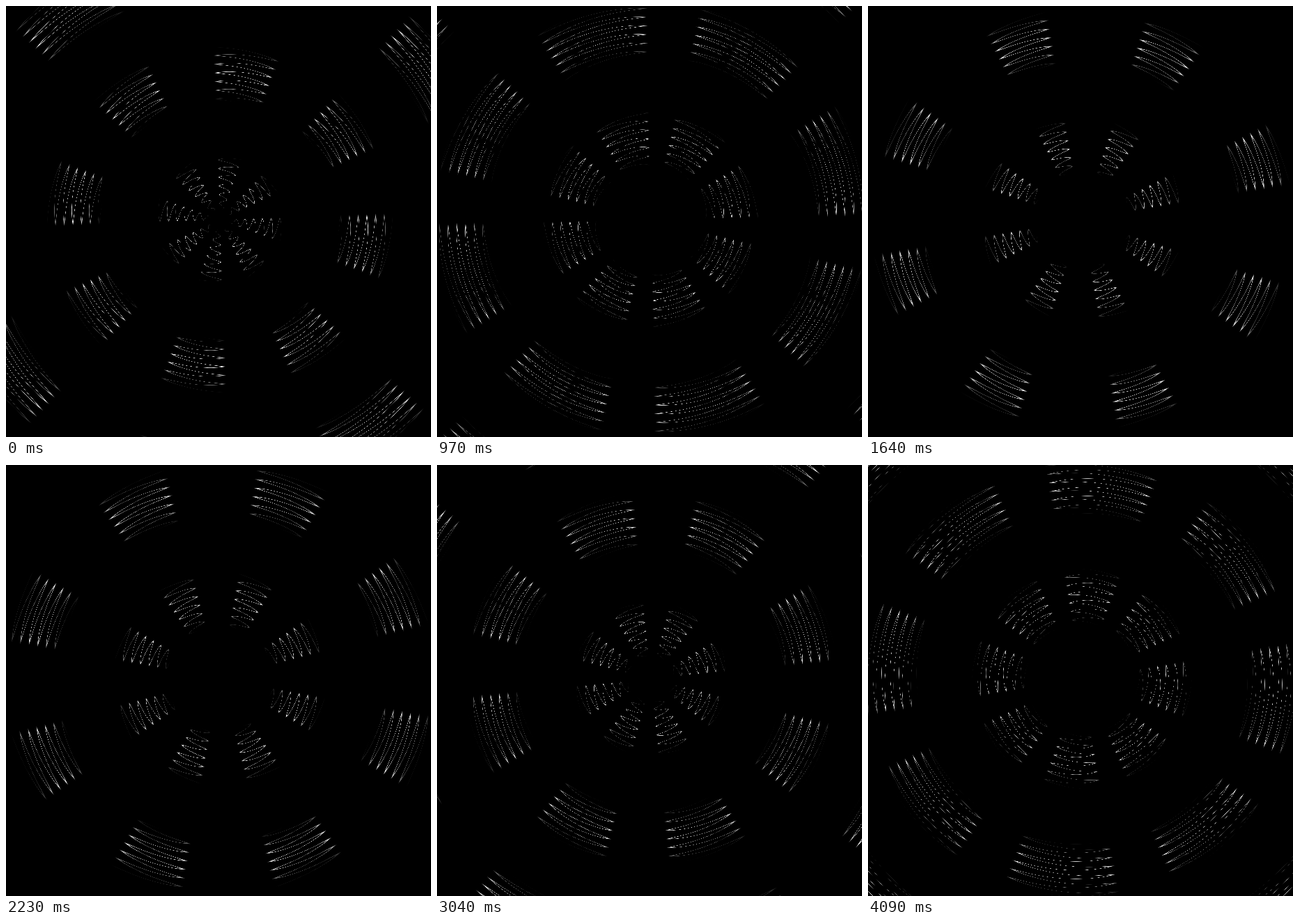
Animation of 610 by 619 pixels, one loop 4.16 s. Source, as an HTML page with a canvas:

```html
<!DOCTYPE html>
<html lang="en">
<head>
<meta charset="utf-8">
<title>Polar waves</title>
<style>
html, body { margin: 0; width: 100%; height: 100%; overflow: hidden; background: #000; }
canvas { display: block; }
</style>
</head>
<body>
<canvas id="stage" width="610" height="619"></canvas>
<script>
const W = 610, H = 619, LOOP = 4160;
const CX = 306.5, CY = 306.5;
const DEG = Math.PI / 180;
const SPACING = 45 * DEG;     // angle between spokes
const HALF_WIDTH = 0.022;     // half line width, in radians
const WAVE = 2 * Math.PI / 12.5;
const BAND = WAVE * 0.08;

// Runs of evenly spaced steps: first time, last time, count
const RUNS = [
  [0, 0, 1], [70, 570, 9], [640, 1110, 8], [1180, 1640, 8], [1710, 2230, 9],
  [2300, 2770, 8], [2830, 3290, 8], [3360, 3840, 8], [3900, 4090, 4]
];
const times = RUNS.flatMap(([a, b, n]) =>
  Array.from({ length: n }, (_, i) =>
    n > 1 ? Math.floor((a + (b - a) * i / (n - 1)) / 10) * 10 : a));

const ctx = document.getElementById('stage').getContext('2d');
const image = ctx.createImageData(W, H);
const pixels = new Uint32Array(image.data.buffer);
const radius = new Float32Array(W * H);
const angle = new Float32Array(W * H);

for (let y = 0, i = 0; y < H; y++) {
  for (let x = 0; x < W; x++, i++) {
    radius[i] = Math.hypot(x - CX, y - CY);
    angle[i] = Math.atan2(x - CX, CY - y);   // clockwise from the top
  }
}

// Each step advances the scene by 1/15 s
function draw(step) {
  const t = 1.2 + step / 15;
  const flow = 10 * t;
  const turn = 9.1 * DEG + 0.075 * step;
  const swing = 15 * DEG * Math.sin(2 * t);

  for (let i = 0; i < pixels.length; i++) {
    const r = radius[i];
    const glow = Math.sin(BAND * r + flow);
    let v = 0;
    if (glow > 0) {
      let d = angle[i] - turn - swing * Math.sin(WAVE * r - 0.25 + flow);
      d -= SPACING * Math.round(d / SPACING);
      const line = 1 - Math.abs(d) / HALF_WIDTH;
      if (line > 0) v = 255 * glow * line | 0;
    }
    pixels[i] = 0xff000000 | v << 16 | v << 8 | v;
  }
  ctx.putImageData(image, 0, 0);
}

const start = performance.now();
let shown = -1;

function tick() {
  const t = (performance.now() - start) % LOOP;
  let k = times.length - 1;
  while (k > 0 && times[k] > t) k--;
  if (k !== shown) {
    shown = k;
    draw(k);
  }
  requestAnimationFrame(tick);
}
tick();
</script>
</body>
</html>
```
